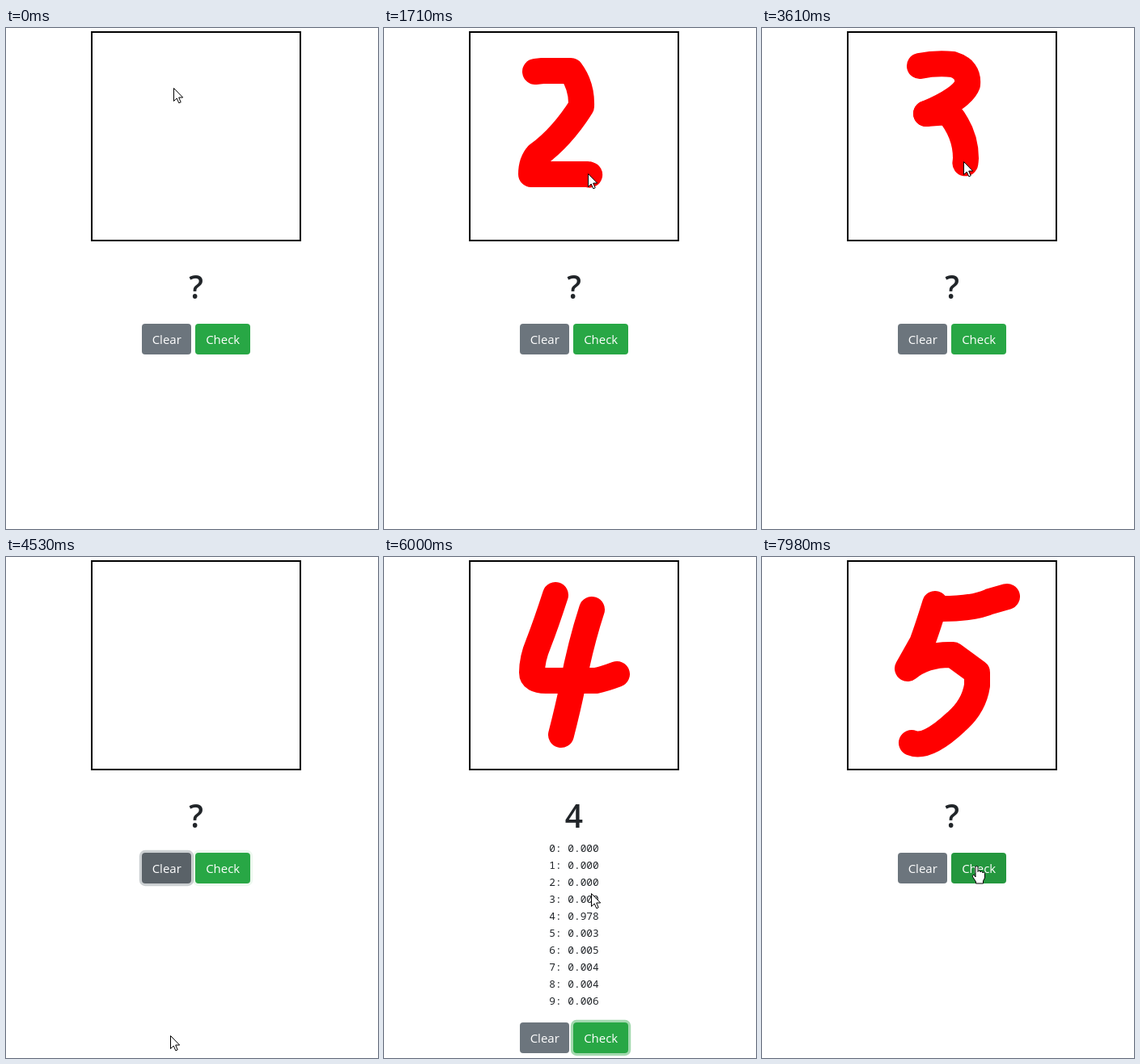
Recreate the animation shown at these times as an HTML page. Size 460x620 px, loop 8 s.

```html
<!DOCTYPE html>
<html lang="en">
<head>
<meta charset="utf-8">
<title>Digit recogniser</title>
<style>
  html, body { margin: 0; width: 100%; height: 100%; overflow: hidden; background: #fff; }
  svg { display: block; width: 460px; height: 620px; }
  #ink path { fill: none; stroke: red; stroke-width: 32; stroke-linecap: round; stroke-linejoin: round; }
  #guess { font: 600 39px "Open Sans", sans-serif; fill: #212529; text-anchor: middle; }
  #scores { font: 12.83px "Noto Sans Mono", monospace; fill: #212529; white-space: pre; }
  .button text { font: 15px "Open Sans", sans-serif; fill: #fff; text-anchor: middle; }
  .ring { fill: none; stroke-width: 3.2; }
  .cursor { fill: #fff; stroke: #000; stroke-linejoin: round; }
</style>
</head>
<body>
<svg viewBox="0 0 460 620">
  <rect x="106" y="5" width="258" height="258" fill="#fff" stroke="#000" stroke-width="2"/>
  <g id="ink"></g>
  <text id="guess" x="235" y="334.5">?</text>
  <g id="scores"></g>
  <g id="buttons">
    <g id="clear" class="button">
      <rect class="ring" x="166.4" y="364.4" width="64.2" height="41.2" rx="5.6" stroke="#828a91"/>
      <rect class="face" x="168" y="366" width="61" height="38" rx="4"/>
      <text x="198.7" y="391">Clear</text>
    </g>
    <g id="check" class="button">
      <rect class="ring" x="232.4" y="364.4" width="71.2" height="41.2" rx="5.6" stroke="#48b461"/>
      <rect class="face" x="234" y="366" width="68" height="38" rx="4"/>
      <text x="268.2" y="391">Check</text>
    </g>
  </g>
  <path id="arrow" class="cursor" d="M.5 .5V16.5L4.2 13 6.8 18.8 9.2 17.8 6.7 12H11.7Z"/>
  <path id="hand" class="cursor" d="M-2 14V2Q-2 .5-.5 .5T1 2V7.5Q1.2 6 2.5 6T4 8Q4.2 7 5.5 7T7 9Q7.3 8 8.4 8T9.5 9.8V15L7.5 19V22H-1.5V20L-5 14.5Q-6.3 12.5-5 11.5T-2 14Z"/>
</svg>
<script>
const LOOP = 8000, FRAME = 78.2, FADE = 150;
const DWELL = 150;    // pointer rests on a button before the click
const TRAVEL = 165;   // longest move between two places
const START = [207, 74], CHECK = [266, 382], CLEAR = [203, 592];

const $ = id => document.getElementById(id);
const svg = (tag, parent, attrs) => {
  const el = document.createElementNS("http://www.w3.org/2000/svg", tag);
  for (const k in attrs) el.setAttribute(k, attrs[k]);
  return parent.appendChild(el);
};

function stroke(start, end, d) {
  const path = svg("path", $("ink"), { d, pathLength: 1 });
  const length = path.getTotalLength();
  const tip = p => {
    const { x, y } = path.getPointAtLength(length * p);
    return [x - 2, y - 2];
  };
  return { start, end, path, tip };
}

const rounds = [
  { digit: 1, check: 625, clear: 860, scores: { 1: 0.982, 2: 0.003, 7: 0.015 }, strokes: [
    stroke(100, 330, "M207 40L215 192")] },
  { digit: 2, check: 2040, clear: 2510, scores: { 1: 0.004, 2: 0.867, 6: 0.001, 7: 0.128 }, strokes: [
    stroke(1045, 1733, "M187 54L196 53H231Q245 72 244 97 220 135 190 157 182 166 182 181H252L259 183")] },
  { digit: 3, check: 4130, clear: 4455, scores: { 2: 0.006, 3: 0.974, 5: 0.02 }, strokes: [
    stroke(2830, 3230, "M195 47Q215 43 236 45 256 51 254 70 248 87 203 106"),
    stroke(3370, 3760, "M203 106L230 104Q252 130 252 161 250 203 202 205")] },
  { digit: 4, check: 5760, clear: 6310, scores: { 4: 0.978, 5: 0.003, 6: 0.005, 7: 0.004, 8: 0.004, 9: 0.006 }, strokes: [
    stroke(4835, 5155, "M212 47Q200 84 191 107 183 126 183 143 183 153 200 153H262Q272 151 288 145"),
    stroke(5310, 5550, "M257 65Q243 108 233 160 228 185 219 220")] },
  { digit: 5, check: 8050, clear: 9000, scores: {}, strokes: [
    stroke(6490, 7210, "M214 58Q204 90 198 106L180 138Q202 120 236 121L266 143V159Q262 185 240 204 204 238 185 230"),
    stroke(7290, 7600, "M214 64Q260 65 282 55L303 49")] }
];
const strokes = rounds.flatMap(r => r.strokes);
rounds.forEach((r, i) => r.blur = rounds[i + 1] ? rounds[i + 1].strokes[0].start + 120 : Infinity);

// Pointer stops as [time, x, y]: every stroke, then Check, then Clear
const stops = [[0, ...START]];
function visit(arrive, leave, from, to = from) {
  const [left, ...place] = stops.at(-1);
  stops.push([Math.max(left, arrive - TRAVEL), ...place], [arrive, ...from], [leave, ...to]);
}
for (const r of rounds) {
  for (const s of r.strokes) visit(s.start, s.end, s.tip(0), s.tip(1));
  visit(r.check - DWELL, r.check + 40, CHECK);
  visit(r.clear - DWELL, r.clear + 40, CLEAR);
}

const rows = Array.from({ length: 10 }, (_, i) =>
  svg("text", $("scores"), { x: 204.2, y: 365 + 21 * i }));

const clamp = v => Math.min(1, Math.max(0, v));
const fade = (t, on, off) => clamp((t - on) / FADE) - clamp((t - off) / FADE);
const mix = (a, b, p) => `rgb(${a.map((v, i) => Math.round(v + (b[i] - v) * p))})`;
const strongest = f => Math.max(...rounds.map(f));

function pointerAt(t) {
  const s = strokes.find(s => t >= s.start && t <= s.end);
  if (s) return s.tip((t - s.start) / (s.end - s.start));
  const i = stops.findIndex(stop => stop[0] > t);
  const [ta, ...a] = stops[i - 1], [tb, ...b] = stops[i];
  return a.map((v, k) => v + (b[k] - v) * (t - ta) / (tb - ta));
}

function paintButton(id, base, dark, hover, focus) {
  $(id).querySelector(".face").setAttribute("fill", mix(base, dark, hover));
  $(id).querySelector(".ring").setAttribute("opacity", focus * 0.5);
}

function draw(t) {
  for (const s of strokes) {
    const wiped = rounds.some(r => s.start < r.clear && r.clear <= t);
    s.path.style.display = t >= s.start && !wiped ? "" : "none";
    const p = clamp((t - s.start) / (s.end - s.start));
    s.path.setAttribute("stroke-dasharray", p < 1 ? `${p} 3` : "none");
  }

  const shown = rounds.find(r => t >= r.check && t < r.clear);
  $("guess").textContent = shown ? shown.digit : "?";
  $("scores").style.display = shown ? "" : "none";
  if (shown) rows.forEach((row, i) => row.textContent = `${i}: ${(shown.scores[i] || 0).toFixed(3)}`);
  $("buttons").setAttribute("transform", `translate(0 ${shown ? 210 : 0})`);

  paintButton("clear", [108, 117, 125], [90, 98, 104],
    strongest(r => fade(t, r.clear - DWELL, r.clear + 80)),
    strongest(r => fade(t, r.clear - 40, r.blur)));
  paintButton("check", [40, 167, 69], [33, 136, 56],
    strongest(r => fade(t, r.check - DWELL, r.check + 80)),
    strongest(r => fade(t, r.check, r.clear - 40)));

  const pointing = rounds.some(r => [r.check, r.clear].some(click => t >= click - DWELL && t < click));
  const [x, y] = pointerAt(t).map(Math.round);
  for (const id of ["arrow", "hand"]) {
    $(id).setAttribute("transform", `translate(${x} ${y})`);
    $(id).style.display = (id === "hand") === pointing ? "" : "none";
  }
}

// The picture refreshes at a steady, low frame rate
const began = performance.now();
function frame() {
  const now = (performance.now() - began) % LOOP;
  draw(Math.floor((now + 25) / FRAME) * FRAME);
  requestAnimationFrame(frame);
}
frame();
</script>
</body>
</html>
```
